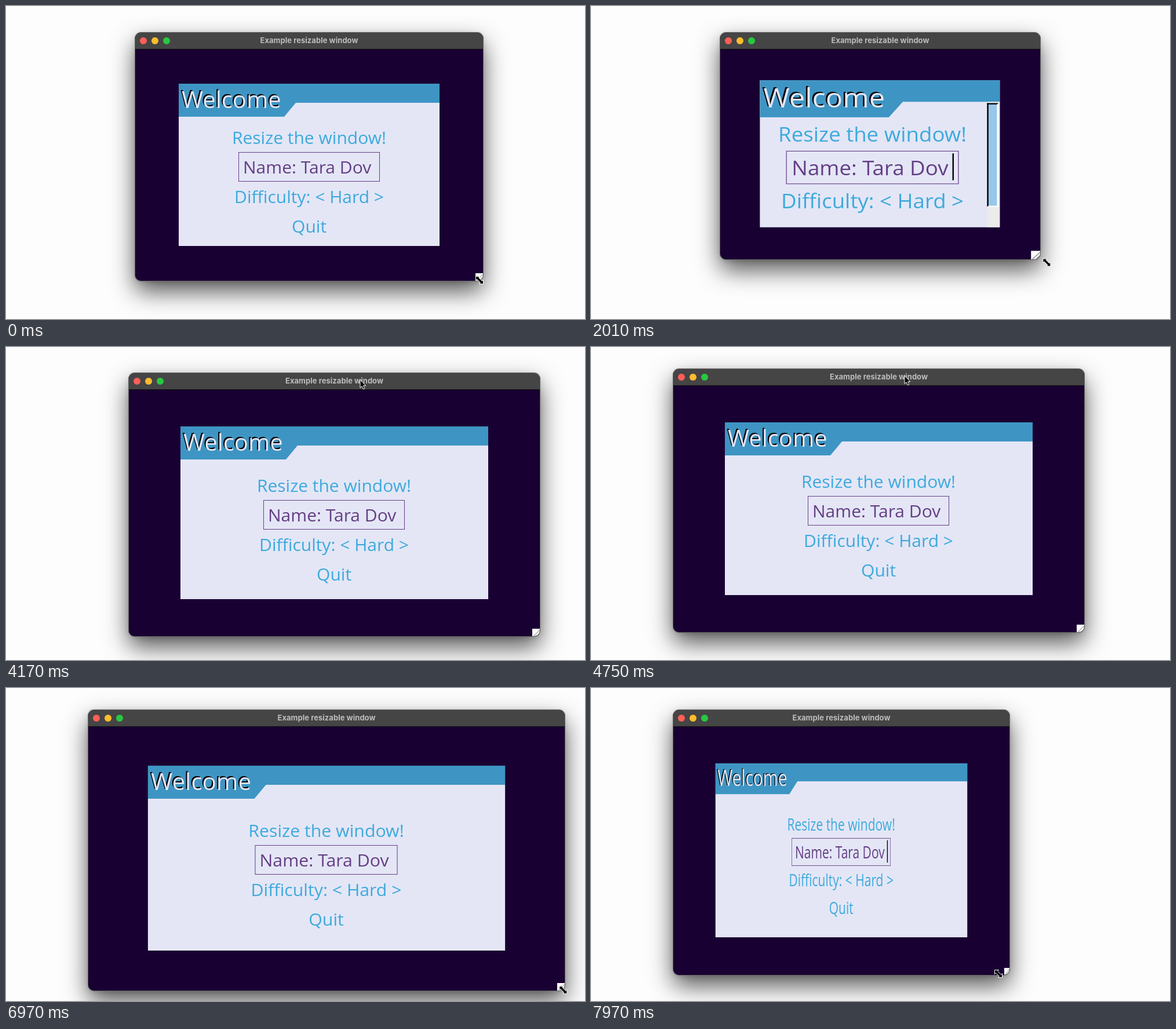
An HTML page that plays this animation: 999x540 px, repeating every 8 s.

```html
<!DOCTYPE html>
<html lang="en">
<head>
<meta charset="utf-8">
<title>Example resizable window</title>
<style>
  html, body { margin: 0; width: 100%; height: 100%; overflow: hidden; background: #fff; }
  #stage { position: relative; width: 999px; height: 540px; overflow: hidden; background: #fdfdfd; }
  #stage div, #stage svg { position: absolute; }
  #win {
    left: 0; top: 0; border-radius: 10px;
    box-shadow: 0 0 0 1px #666, 0 18px 42px rgba(0, 0, 0, .68), 0 2px 10px rgba(0, 0, 0, .15);
  }
  #clip { inset: 0; overflow: hidden; border-radius: 10px; background: #190032; }
  #bar {
    left: 0; right: 0; top: 0; height: 28px; background: #454545; box-shadow: 0 1px #0c0c0c;
    font: 700 13px/27px Inter, "Liberation Sans", sans-serif; letter-spacing: .04px;
    color: #bdbdbd; text-align: center;
  }
  .light { top: 8px; width: 12px; height: 12px; border-radius: 50%; }
  #content { left: 0; top: 28px; transform-origin: 0 0; background: #190032; }
  #panel { overflow: hidden; background: #e4e6f6; font-family: "Open Sans", "Noto Sans", sans-serif; }
  #head {
    inset: 0 0 auto 0; height: 57px; background: #3e95c3;
    clip-path: polygon(0 0, 100% 0, 100% 33px, 202px 33px, 182px 57px, 0 57px);
  }
  #title {
    left: 5px; top: 0; font-size: 40px; line-height: 54px; color: #e4e6f6;
    text-shadow: -2px -2px 0 #000; white-space: nowrap;
  }
  .row {
    left: -150px; width: 300px; height: 51px;
    font-size: 30px; line-height: 51px; color: #3daadc; text-align: center; white-space: nowrap;
  }
  #name {
    left: -122px; width: 244px; box-sizing: border-box; padding-left: 7px;
    border: 1px solid #643e84; line-height: 49px; color: #643e84; text-align: left;
  }
  #caret { left: 234px; top: 3px; width: 2px; height: 41px; background: #000; }
  #scroll { right: 0; top: 33px; bottom: 0; width: 18px; background: #ebebeb; }
  #thumb {
    left: 0; top: 2px; width: 12px; background: #97c8e9;
    border: 2px solid #fff; border-left-color: #000; border-top-color: #000;
  }
  #grip { right: 0; bottom: 0; }
  .pointer { left: 0; top: 0; overflow: visible; }
</style>
</head>
<body>
<div id="stage">
  <div id="win">
    <div id="clip">
      <div id="content">
        <div id="panel">
          <div id="rows">
            <div class="row" style="top:0">Resize the window!</div>
            <div class="row" id="name" style="top:51px">Name: Tara Dov<div id="caret"></div></div>
            <div class="row" style="top:102px">Difficulty: &lt; Hard &gt;</div>
            <div class="row" style="top:153px">Quit</div>
          </div>
          <div id="head"><div id="title">Welcome</div></div>
          <div id="scroll"><div id="thumb"></div></div>
        </div>
        <svg id="grip" width="13" height="13">
          <path fill="#fff" d="M0 0H13V13H0Z"/>
          <path stroke="#777" fill="none" d="M2 13 13 2M7 13 13 7"/>
        </svg>
      </div>
      <div id="bar">Example resizable window
        <div class="light" style="left:8px;background:#ff5f57"></div>
        <div class="light" style="left:28px;background:#febc2e"></div>
        <div class="light" style="left:48px;background:#28c840"></div>
      </div>
    </div>
  </div>
  <svg id="arrow" class="pointer" width="1" height="1">
    <path d="M0 0V14L3.1 11.2 5.4 16.4 7.8 15.4 5.6 10.3H9.9Z" stroke="#fff"/>
  </svg>
  <svg id="sizer" class="pointer" width="1" height="1">
    <path d="M-6.5-6.5H.5L-1.5-4.5 4.5 1.5 6.5-.5V6.5H-.5L1.5 4.5-4.5-1.5-6.5 .5Z" stroke="#fff"/>
  </svg>
</div>
<script>
const LOOP = 8000;
const BAR = 28;
const LEAD = 45;    // the window trails the resizing pointer by this time
const SETTLE = 50;  // the menu is laid out anew this long after a resize
const $ = id => document.getElementById(id);

const winStart = { x: 223, y: 46, w: 600, h: 400 };
const winMoves = [
  { from: 340, to: 890, w: 452, h: 322 },
  { from: 1750, to: 2420, w: 709, h: 426 },
  { from: 4080, to: 4750, x: 142, y: 38 },
  { from: 6450, to: 6740, w: 815, h: 456 },
  { from: 6890, to: 7060, w: 829 },
  { from: 7620, to: 7990, w: 567, h: 428 }
];
const pathStart = { x: 926, y: 499 };
const pathMoves = [
  { from: 2690, to: 2830, x: 715, y: 163 },
  { from: 2830, to: 3230, x: 652, y: 79 },
  { from: 3450, to: 3930, x: 622, y: 57.5 },
  { from: 4080, to: 4750, x: 541, y: 49.5 },
  { from: 4900, to: 4980, x: 878, y: 396 },
  { from: 5160, to: 6150, x: 848, y: 489 }
];
const caretOn = [[940, 2950], [3460, 3930], [5460, 5980], [7080, LOOP]];

const within = (t, [a, b]) => t >= a && t < b;

// Values hold between moves and run evenly within them.
function stateAt(start, moves, t) {
  const now = { ...start };
  for (const { from, to, ...goal } of moves) {
    const k = Math.min(1, Math.max(0, (t - from) / (to - from)));
    for (const key in goal) now[key] += (goal[key] - now[key]) * k;
  }
  return now;
}

const winAt = t => stateAt(winStart, winMoves, t);

// The size the menu was last laid out for.
function layoutAt(t) {
  const done = winMoves.filter(m => m.w && m.to + SETTLE <= t).pop();
  return done ? winAt(done.to) : winStart;
}

function pointerAt(t) {
  if (within(t, [2690, 6400])) return stateAt(pathStart, pathMoves, t);
  const { x, y, w, h } = winAt(t + LEAD);
  return { x: x + w - 6, y: y + BAR + h - 1 };
}

function box(el, x, y, w, h) {
  el.style.left = x + "px";
  el.style.top = y + "px";
  el.style.width = w + "px";
  el.style.height = h + "px";
}

function layOut(w, h) {
  const half = v => Math.floor(v / 2);
  const pw = Math.floor(w * .75), ph = Math.floor(h * .7);
  const area = ph - 57, need = 203, scrolls = area < need;
  box($("content"), 0, BAR, w, h);
  box($("panel"), half(w - pw), half(h - ph), pw, ph);
  box($("rows"), half(pw - (scrolls ? 20 : 0)), 57 + Math.max(0, half(area - need)), 0, 204);
  $("scroll").style.display = scrolls ? "" : "none";
  $("thumb").style.height = Math.floor((ph - 33) * area / need) - 3 + "px";
}

function draw() {
  const t = performance.now() % LOOP;
  const win = winAt(t), layout = layoutAt(t);
  const w = Math.round(win.w), h = Math.round(win.h);
  box($("win"), Math.round(win.x), Math.round(win.y), w, h + BAR);
  layOut(layout.w, layout.h);
  $("content").style.transform = `scale(${w / layout.w}, ${h / layout.h})`;
  $("caret").style.display = caretOn.some(span => within(t, span)) ? "" : "none";

  const { x, y } = pointerAt(t);
  const free = within(t, [2690, 5970]);
  $("arrow").style.display = free ? "" : "none";
  $("sizer").style.display = free ? "none" : "";
  $(free ? "arrow" : "sizer").style.transform = `translate(${x}px, ${y}px)`;
  requestAnimationFrame(draw);
}
draw();
</script>
</body>
</html>
```
